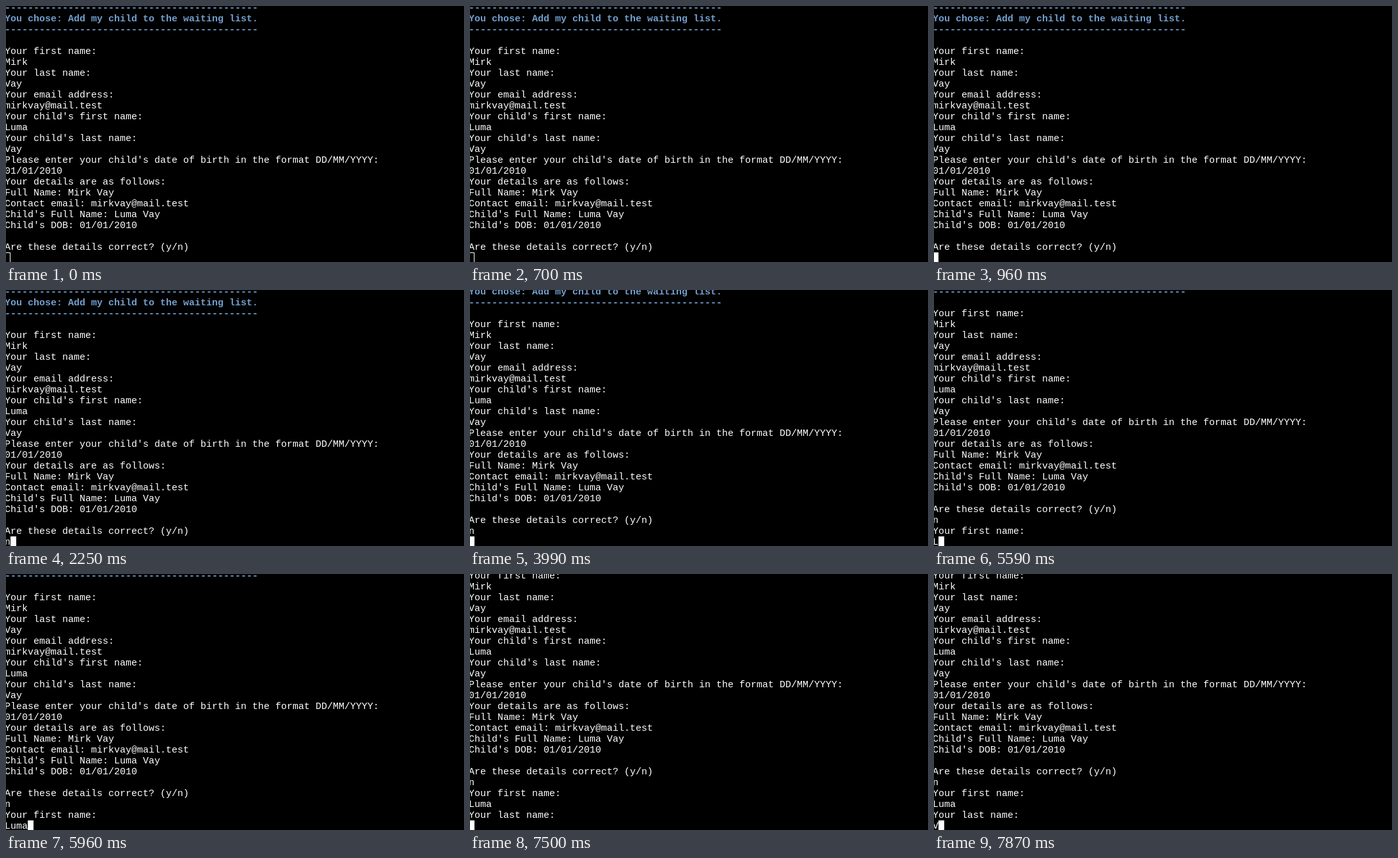
Animation, 716 px wide and 400 px high, one loop 8 s. Source, as an HTML page:

```html
<!DOCTYPE html>
<html lang="en">
<head>
<meta charset="utf-8">
<title>Waiting list terminal</title>
<style>
  html, body { margin: 0; width: 100%; height: 100%; overflow: hidden; background: #000; }
  svg { display: block; width: 716px; height: 400px; }
  text { font: 15px "Liberation Mono", "Courier New", monospace; fill: #fff; white-space: pre; }
  .title { font-weight: bold; fill: #729fcf; }
  #cursor { fill: #fff; stroke: #fff; stroke-width: 1; }
  #cursor.idle { fill: none; }
</style>
</head>
<body>
<svg id="screen" viewBox="0 0 716 400"><rect id="cursor" width="8" height="16"/></svg>
<script>
  const LOOP = 8000, FOCUS = 730;
  const ROWS = 24, CELL_W = 9, CELL_H = 17, LEFT = -2, TOP = -6, BASELINE = 13;
  const TITLE_ROWS = 3;
  const rule = '-'.repeat(44);

  const start = `${rule}
You chose: Add my child to the waiting list.
${rule}

Your first name:
Mirk
Your last name:
Vay
Your email address:
mirkvay@mail.test
Your child's first name:
Luma
Your child's last name:
Vay
Please enter your child's date of birth in the format DD/MM/YYYY:
01/01/2010
Your details are as follows:
Full Name: Mirk Vay
Contact email: mirkvay@mail.test
Child's Full Name: Luma Vay
Child's DOB: 01/01/2010

Are these details correct? (y/n)
`;

  // Output appended to the terminal at each time
  const output = [
    [2250, 'n'],
    [3990, '\n'],
    [4010, 'Your first name:\n'],
    [5590, 'L'],
    [5780, 'u'],
    [5870, 'm'],
    [5960, 'a'],
    [7500, '\nYour last name:\n'],
    [7870, 'V']
  ];

  const screen = document.getElementById('screen');
  const cursor = document.getElementById('cursor');
  const rows = Array.from({ length: ROWS }, (_, i) => {
    const row = document.createElementNS('http://www.w3.org/2000/svg', 'text');
    row.setAttribute('x', LEFT);
    row.setAttribute('y', TOP + i * CELL_H + BASELINE);
    return screen.insertBefore(row, cursor);
  });

  let shown = null;

  function print(buffer) {
    const lines = buffer.split('\n');
    const first = lines.length - ROWS;
    rows.forEach((row, i) => {
      row.textContent = lines[first + i];
      row.classList.toggle('title', first + i < TITLE_ROWS);
    });
    const column = lines[lines.length - 1].length;
    cursor.setAttribute('x', LEFT + column * CELL_W + 0.5);
    cursor.setAttribute('y', TOP + (ROWS - 1) * CELL_H + 0.5);
  }

  function draw() {
    const t = performance.now() % LOOP;
    const buffer = start + output.filter(([at]) => t >= at).map(([, s]) => s).join('');
    if (buffer !== shown) print(shown = buffer);
    cursor.classList.toggle('idle', t < FOCUS);
    requestAnimationFrame(draw);
  }
  draw();
</script>
</body>
</html>
```
